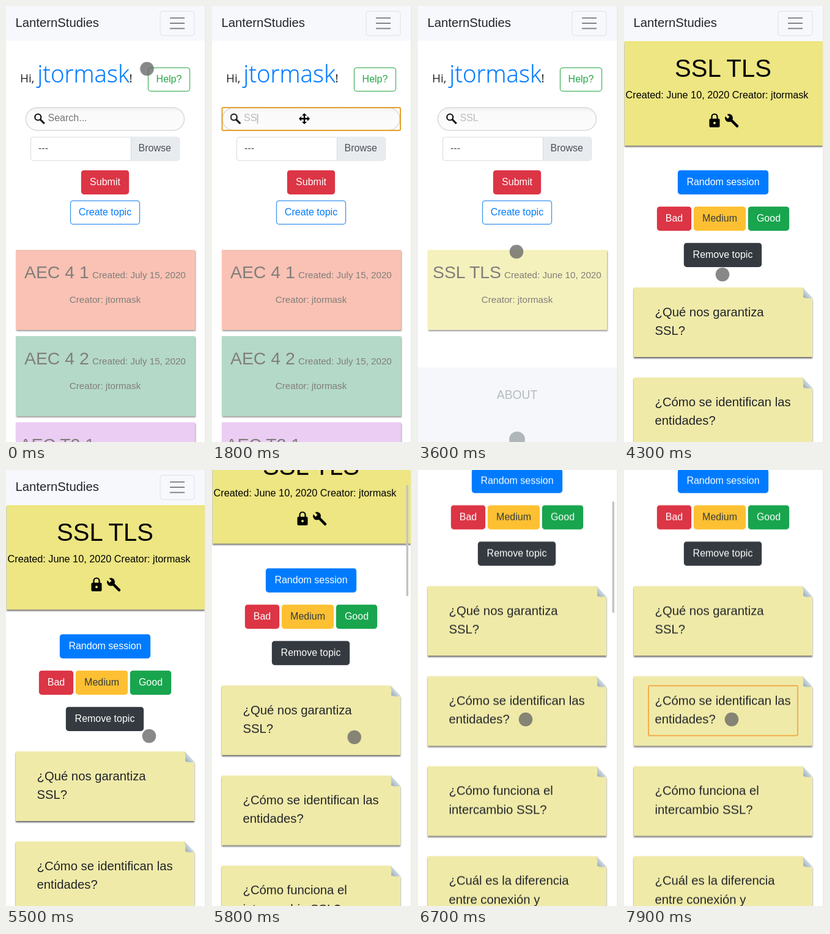
Recreate the animation shown at these times as an HTML page. Size 327 by 708 pixels, loop 8 s.

```html
<!DOCTYPE html>
<html lang="en">
<head>
<meta charset="utf-8">
<title>Study cards</title>
<style>
html, body { margin: 0; width: 100%; height: 100%; overflow: hidden; background: #fff; }
svg { display: block; width: 327px; height: 708px; font: 16px "Liberation Sans", Arial, sans-serif; }
.mid { text-anchor: middle; }
.small { font-size: 15.2px; }
.note { font-size: 20.3px; fill: #212529; }
.hello { font: 19px "Open Sans", "Noto Sans", sans-serif; fill: #212529; }
.hello .user { font-size: 38.5px; font-weight: 300; fill: #007bff; stroke: #007bff; stroke-width: .3; }

#page, #pill, #query, #pointer, #bar, #barFade { animation: 8s linear infinite; }
#page { animation-name: scroll; }
#pill { animation-name: pill; }
#query { animation-name: query; }
#pointer { animation-name: pointer; }
#bar { animation-name: bar; }
#barFade { animation-name: fade; }

/* three wheel notches of 89.5px */
@keyframes scroll {
  0%, 69.4% { transform: none; }
  71.6%, 72% { transform: translateY(-89.5px); }
  74.6%, 75.8% { transform: translateY(-179px); }
  78.3%, 100% { transform: translateY(-268.5px); }
}
@keyframes bar {
  0%, 69.4% { transform: translateY(6px); }
  71.6%, 72% { transform: translateY(21px); }
  74.6%, 75.8% { transform: translateY(36px); }
  78.3%, 100% { transform: translateY(51px); }
}
@keyframes fade {
  0%, 69.3% { opacity: 0; }
  70.5%, 86.5% { opacity: 1; }
  89.5%, 100% { opacity: 0; }
}
@keyframes pill {
  0%, 9.9% { x: 32.5px; width: 259px; }
  11%, 35% { x: 17px; width: 290px; }
  36.2%, 100% { x: 32.5px; width: 259px; }
}
@keyframes query {
  0%, 9.9% { transform: none; }
  11%, 35% { transform: translateX(-16.5px); }
  36.2%, 100% { transform: none; }
}
@keyframes pointer {
  0%, 1% { transform: translate(230.5px, 102px); animation-timing-function: ease-in-out; }
  9%, 35% { transform: translate(151px, 183px); animation-timing-function: ease-in-out; }
  43.5%, 46% { transform: translate(161px, 399px); }
  49%, 57.5% { transform: translate(161px, 436px); animation-timing-function: ease-in-out; }
  67.5%, 69% { transform: translate(234px, 432px); }
  74.5%, 78.5% { transform: translate(232px, 435px); animation-timing-function: ease-in-out; }
  82.5%, 100% { transform: translate(176px, 405px); }
}
</style>
</head>
<body>
<svg viewBox="0 0 327 708">
  <defs>
    <filter id="drop" x="-5%" y="-10%" width="110%" height="125%">
      <feDropShadow dx="1" dy="2" stdDeviation="1.2" flood-opacity=".38"/>
    </filter>
    <filter id="lift" x="-5%" y="-10%" width="110%" height="125%">
      <feDropShadow dx="0" dy="2.2" stdDeviation="1.1" flood-opacity=".6"/>
    </filter>
    <linearGradient id="curl" x1="0" y1="1" x2="1" y2="0">
      <stop offset="0" stop-color="#8f9ba3"/>
      <stop offset=".3" stop-color="#b4c4d0"/>
      <stop offset=".55" stop-color="#d3dde4"/>
    </linearGradient>
    <linearGradient id="inset" x1="0" y1="0" x2="0" y2="1">
      <stop offset="0" stop-color="#efefef"/>
      <stop offset=".2" stop-color="#fafafa"/>
      <stop offset="1" stop-color="#fcfcfc"/>
    </linearGradient>
  </defs>

  <rect width="327" height="708" fill="#fff"/>

  <g id="page">
    <rect width="325" height="56.5" fill="#f7f8fb"/>
    <text x="15.5" y="34" font-size="20.3" fill="#212529">LanternStudies</text>
    <rect x="252" y="8.5" width="56" height="39.5" rx="4" fill="none" stroke="#dfe0e3"/>
    <path d="M268 19.5h24M268 28h24M268 36.5h24" stroke="#838487" stroke-width="2"/>

    <g data-show="0-4100">
      <text class="hello" x="23" y="123.5">Hi, <tspan class="user">jtormask</tspan><tspan fill="#111">!</tspan></text>

      <rect id="pill" x="32.5" y="165" width="259" height="37" rx="18.5" fill="url(#inset)" stroke="#d9d9d9" stroke-width="1.5"/>
      <rect data-show="800-2800" x="16.5" y="165" width="291.5" height="37" rx="2" fill="none" stroke="#e3a02a" stroke-width="2"/>
      <g id="query">
        <g fill="none" stroke="#111">
          <circle cx="52.3" cy="180.5" r="5" stroke-width="2.2"/>
          <path d="M56.2 184.4l6.6 6.6" stroke-width="3"/>
        </g>
        <text data-show="0-1400" x="68.5" y="187.3" fill="#757575">Search...</text>
        <g fill="#bcbcbc">
          <text data-show="1400-1600" x="68.5" y="187.3">S</text>
          <text data-show="1600-2000" x="68.5" y="187.3">SS</text>
          <text data-show="2000-8000" x="68.5" y="187.3">SSL</text>
        </g>
        <g stroke="#888">
          <path data-show="1400-1600" d="M80.5 175v16"/>
          <path data-show="1600-2000" d="M91 175v16"/>
          <path data-show="2000-2500" d="M100 175v16"/>
        </g>
      </g>

      <rect x="40.5" y="213" width="243" height="38" rx="4" fill="#fff" stroke="#d5dae0"/>
      <path d="M204.5 213.5h75a4 4 0 0 1 4 4v29.5a4 4 0 0 1 -4 4h-75z" fill="#e9ecef"/>
      <path d="M204.5 213v38" stroke="#d5dae0"/>
      <g fill="#495057">
        <text x="53" y="236">---</text>
        <text x="216.5" y="236">Browse</text>
      </g>

      <g id="homeButtons"></g>
      <g id="allTopics" data-show="0-2400"></g>
      <g id="found" data-show="2400-4100">
        <rect y="587" width="325" height="121" fill="#f6f7fa"/>
        <text class="mid" x="162" y="638" font-size="19.3" fill="#b4bcbf">ABOUT</text>
        <circle cx="162" cy="704" r="13" fill="#b0b6ba"/>
      </g>
    </g>

    <g data-show="4100-8000">
      <rect x="1" y="57" width="324" height="169.5" fill="#ede682" filter="url(#lift)"/>
      <text class="mid" x="162" y="114.5" font-size="40">SSL TLS</text>
      <text x="2.5" y="150" font-size="16.25">Created: June 10, 2020 Creator: jtormask</text>
      <rect x="139.5" y="183" width="17" height="14" rx="2"/>
      <path d="M143.5 183v-3a4.5 4.5 0 0 1 9 0v3" fill="none" stroke="#000" stroke-width="2.2"/>
      <circle cx="148" cy="190" r="2" fill="#ede682"/>
      <path d="M174 184l11 11" stroke="#000" stroke-width="4.5" stroke-linecap="round"/>
      <circle cx="171.5" cy="181.8" r="6.5"/>
      <path d="M164 177.5l3-3 5.5 5.5-3 3z" fill="#ede682"/>
      <g id="topicButtons"></g>
      <g id="notes"></g>
      <rect data-show="7500-8000" x="40" y="618.8" width="244" height="81" rx="2" fill="none" stroke="#f39a2b" stroke-width="1.5"/>
    </g>
  </g>

  <rect x="325" width="2" height="708" fill="#ececee"/>
  <g id="barFade"><rect id="bar" x="317.5" width="3.5" height="181" rx="1.7" fill="#c4c4c4"/></g>

  <g id="pointer">
    <g fill="#666" fill-opacity=".78">
      <circle data-show="0-900" r="11.3"/>
      <circle data-show="2800-8000" r="11.3"/>
    </g>
    <path data-show="900-2800" d="M0 -9l4 4h-2.8v3.8h3.8v-2.800l4 4-4 4v-2.800h-3.800v3.800h2.800l-4 4-4-4h2.800v-3.800h-3.800v2.800l-4-4 4-4v2.800h3.800v-3.800h-2.800z" stroke="#fff" stroke-width="1.6" stroke-linejoin="round" paint-order="stroke"/>
  </g>
</svg>

<script>
const LOOP = 8000;
const add = (id, markup) =>
  document.getElementById(id).insertAdjacentHTML('beforeend', markup);

const button = (x, y, w, label, fill, color = '#fff', line = fill) => `
  <rect x="${x + .5}" y="${y + .3}" width="${w - 1}" height="38" rx="4" fill="${fill}" stroke="${line}" stroke-width="1.3"/>
  <text class="mid" x="${x + w / 2}" y="${y + 24}" fill="${color}">${label}</text>`;

const topic = (x, y, name, date, fill) => `
  <rect x="16" y="${y}" width="293" height="130" fill="${fill}" filter="url(#drop)"/>
  <g fill="#817e7b">
    <text x="${x}" y="${y + 46.3}" font-size="28.4">${name}</text>
    <text class="small" x="141" y="${y + 46.3}">Created: ${date}, 2020</text>
    <text class="small mid" x="162" y="${y + 86}">Creator: jtormask</text>
  </g>`;

const note = (lines, i) => {
  const height = lines.length > 2 ? 144 : 113;
  return `<g transform="translate(16 ${457 + i * 146.2})">
    <path d="M0 0H276L292 17V${height}H0z" fill="#f0eaa9" filter="url(#lift)"/>
    <path d="M276 0L292 17Q283 19 277 16Q278 8 276 0z" fill="url(#curl)"/>
    ${lines.map((s, k) => `<text class="note" x="34.5" y="${46.7 + k * 30.5}">${s}</text>`).join('')}
  </g>`;
};

add('homeButtons',
  button(232, 100, 69, 'Help?', '#fff', '#28a745', '#4bb563') +
  button(123, 267, 78, 'Submit', '#dc3545') +
  button(105, 316, 114, 'Create topic', '#fff', '#007bff', '#3c94ee'));
add('allTopics',
  topic(30, 396, 'AEC 4 1', 'July 15', '#f9c2b4') +
  topic(30, 536, 'AEC 4 2', 'July 15', '#b4d9c8') +
  topic(22.5, 676, 'AEC T2 1', 'July 15', '#ebcdf3'));
add('found', topic(24, 396, 'SSL TLS', 'June 10', '#f5f1bd'));
add('topicButtons',
  button(88, 267, 148, 'Random session', '#007bff') +
  button(54, 326, 56, 'Bad', '#dc3545') +
  button(114, 326, 85, 'Medium', '#fdc032', '#343a40') +
  button(203, 326, 67, 'Good', '#18a54d') +
  button(98, 385, 127, 'Remove topic', '#343a40'));
add('notes', [
  ['¿Qué nos garantiza', 'SSL?'],
  ['¿Cómo se identifican las', 'entidades?'],
  ['¿Cómo funciona el', 'intercambio SSL?'],
  ['¿Cuál es la diferencia', 'entre conexión y', 'sesión?']
].map(note).join(''));

// Hard on/off switches, given as "from-to" in ms.
for (const el of document.querySelectorAll('[data-show]')) {
  const [from, to] = el.dataset.show.split('-').map(Number);
  const steps = [[0, from ? 0 : 1], [from, 1], [to, 0], [LOOP, 0]];
  el.animate(
    steps.map(([ms, opacity]) => ({ offset: ms / LOOP, opacity, easing: 'step-end' })),
    { duration: LOOP, iterations: Infinity });
}
</script>
</body>
</html>
```
